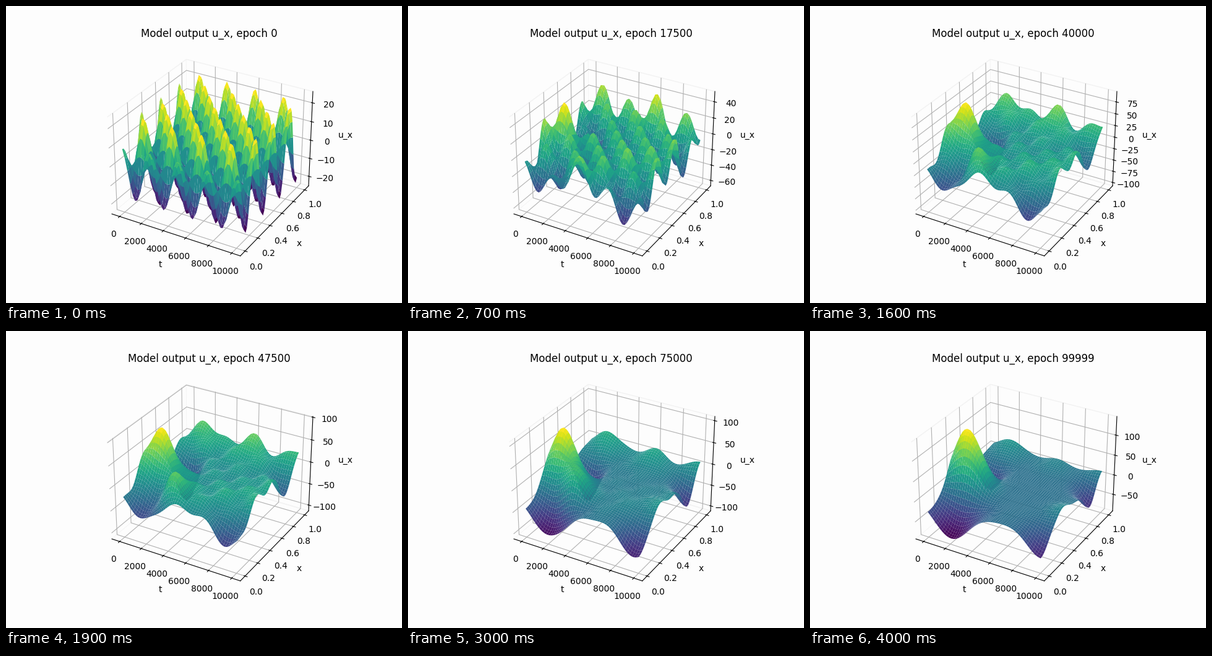
A matplotlib script for the animation above (4100 ms loop, 640 by 480 pixels).

```python
import numpy as np
import matplotlib.pyplot as plt
from matplotlib.animation import FuncAnimation

PAPER = "#fdfdfd"
STEPS = 41
MARGIN = 0.05 + 1.1 / 48
DECAY = 8
N = 51

# Value range of the surface at a few points of the training
RANGE_STEPS = (0, 7, 12, 19, 25, 30, 40)
LOWS = (-22.1, -59.6, -87.6, -100, -118.7, -98, -78)
HIGHS = (22.7, 45, 78.5, 88, 99.5, 95.5, 130.5)

T, X = np.meshgrid(np.linspace(0, 1, N), np.linspace(0, 1, N))


def bump(t, x, width):
    return np.exp(-((T - t) ** 2 + (X - x) ** 2) / width ** 2)


def ripples():
    """Chequered standing wave, weaker along the front edge."""
    edge = np.exp(-(X / 0.07) ** 2)
    wave = np.cos(2 * np.pi * (T - 0.107) / 0.254) * np.cos(2 * np.pi * X / 0.28)
    return -0.46 * (1 - 0.38 * edge) * wave - 0.08 * edge


def landscape(s):
    """Slow hills and dips; s runs from 0 to 1 over the training."""
    def mix(a, b):
        return a + (b - a) * s

    peak = mix(0.38, 0.62) * bump(0.1, 0.41, 0.14)
    ridge = 0.33 * bump(mix(0.5, 0.24), mix(-0.05, 0.34), 0.13)
    valley = mix(-0.8, -0.3) * bump(0.17, 0.64, 0.11)
    shoulder = mix(0.2, 0) * bump(0, 0.24, 0.12)
    front = (mix(-0.2, -0.42) * bump(0.21, 0, 0.21)
             - 0.3 * bump(mix(0.84, 1), 0, 0.16)
             + mix(0.14, 0) * bump(0.75, 0.3, 0.18))
    back = (mix(0.3, 0.17) * bump(0.17, 1.02, 0.17)
            + mix(0.38, 0.08) * bump(0.6, 0.97, 0.15)
            + mix(0.36, 0.1) * bump(1, 1, 0.13))
    right = (mix(0.18, 0) * bump(0.97, 0.61, 0.13)
             + 0.1 * bump(1, 0.35, 0.12)
             - 0.27 * bump(1, 0.8, 0.12))
    return peak + ridge + valley + shoulder + front + back + right


def surface_at(step):
    """Ripples die out while the landscape grows."""
    s = step / (STEPS - 1)
    fade = np.exp(-step / DECAY)
    h = 0.62 - 0.2 * s + fade * ripples() + (1 - fade) * landscape(s)
    low = np.interp(step, RANGE_STEPS, LOWS)
    high = np.interp(step, RANGE_STEPS, HIGHS)
    return low + (high - low) * (h - h.min()) / np.ptp(h)


def limits(v):
    pad = MARGIN * np.ptp(v)
    return v.min() - pad, v.max() + pad


fig = plt.figure(figsize=(6.4, 4.8), dpi=100, facecolor=PAPER)
ax = fig.add_subplot(projection="3d", facecolor=PAPER)
ax.set_xlabel("t")
ax.set_ylabel("x")
ax.set_zlabel("u_x")
for axis in (ax.xaxis, ax.yaxis, ax.zaxis):
    axis.set_pane_color(PAPER)
    axis.pane.set_edgecolor("#f2f2f2")


def update(step):
    for old in list(ax.collections):
        old.remove()
    z = surface_at(step)
    ax.plot_surface(T * 10000, X, z, cmap="viridis", rcount=N, ccount=N,
                    linewidth=0, antialiased=True)
    ax.set_xlim(*limits(T * 10000))
    ax.set_ylim(*limits(X))
    ax.set_zlim(*limits(z))
    ax.set_title(f"Model output u_x, epoch {min(2500 * step, 99999)}")
    return []


anim = FuncAnimation(fig, update, frames=STEPS, interval=100, repeat=True)
plt.show()
```
